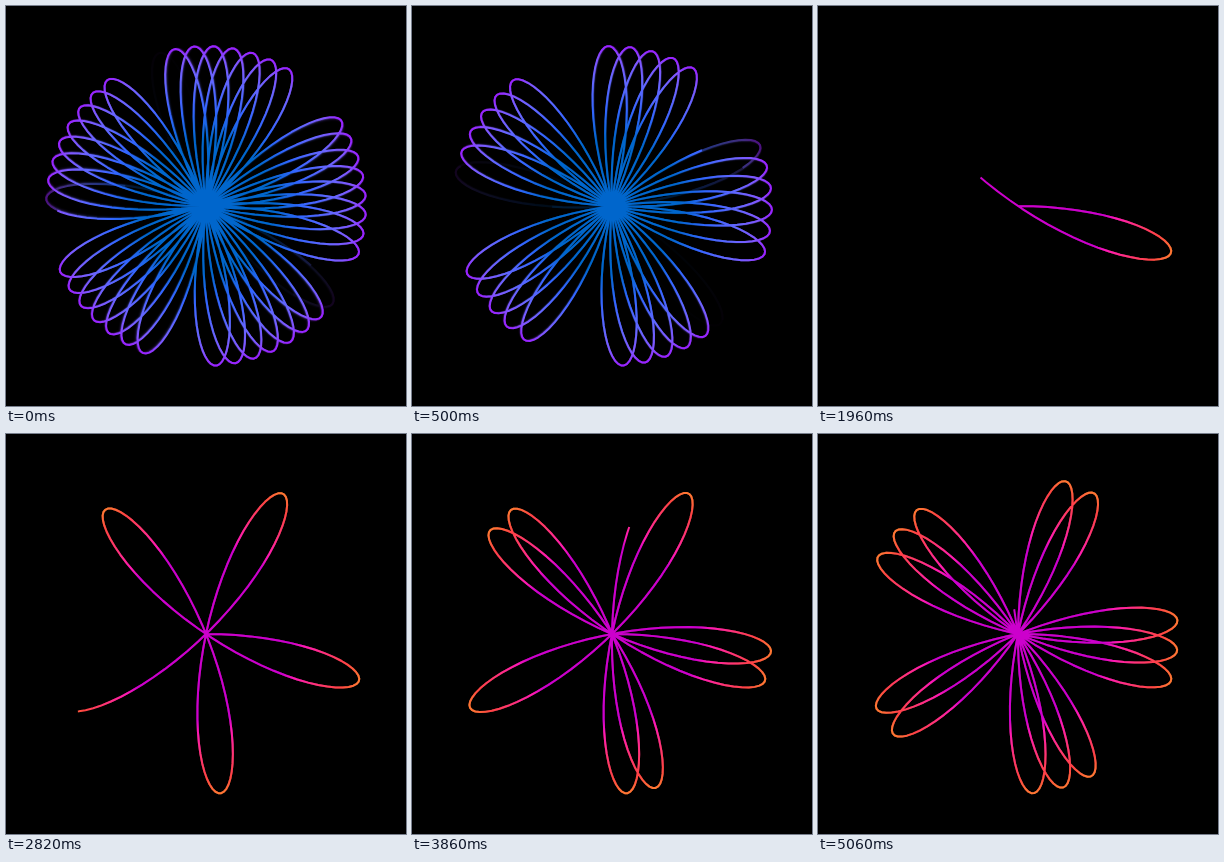
Animation of 400x400 px, one loop 5.08 s. Source, as an HTML page with a canvas:

```html
<!DOCTYPE html>
<html>
<head>
<meta charset="utf-8">
<style>
html, body { margin: 0; height: 100%; overflow: hidden; background: #000; }
canvas { display: block; }
</style>
</head>
<body>
<canvas id="stage" width="400" height="400"></canvas>
<script>
const ctx = document.getElementById('stage').getContext('2d');
const LOOP = 5080, STEP = 20, RADIUS = 160, SWITCH = 82, GHOSTS = 6;

function radial(stops) {
  const g = ctx.createRadialGradient(0, 0, 0, 0, 0, RADIUS);
  for (const [at, color] of stops) g.addColorStop(at, color);
  return g;
}
const cool = radial([[0, '#0066cc'], [0.42, '#0066cc'], [0.6, '#3366ff'],
  [0.8, '#6666ff'], [0.92, '#8055ff'], [1, '#9922ff']]);
const warm = radial([[0, '#cc00cc'], [0.54, '#cc00cc'], [0.62, '#ff1ab3'],
  [0.76, '#ff3377'], [0.9, '#ff4444'], [1, '#ff7733']]);

// Pen progress while drawing: [ms, petals]
const pen = [[1674, 0], [1960, 1.095], [2820, 4.385], [3860, 8.237], [5060, 13.05]];

function drawn(ms) {
  const i = Math.max(1, pen.findIndex(p => p[0] >= ms));
  const [t0, n0] = pen[i - 1], [t1, n1] = pen[i];
  return n0 + (n1 - n0) * (ms - t0) / (t1 - t0);
}

// Rose curve; its precession drifts as petals are erased and drawn
function rose(frame) {
  const erasing = frame < SWITCH;
  const petals = erasing ? 36.38 - 0.446 * frame : drawn(frame * STEP);
  if (petals <= 0) return;
  const drift = 9.91 + (erasing ? -0.078 : 0.078) * petals;
  const width = (36 - drift / 5) * Math.PI / 180;
  ctx.beginPath();
  ctx.moveTo(0, 0);
  for (let n = 0; n < petals;) {
    n = Math.min(n + 0.03, petals);
    const r = RADIUS * Math.sin(Math.PI * n);
    ctx.lineTo(r * Math.cos(n * width), r * Math.sin(n * width));
  }
  ctx.strokeStyle = erasing ? cool : warm;
  ctx.stroke();
}

function render(frame) {
  ctx.setTransform(1, 0, 0, 1, 200, 200);
  ctx.lineWidth = 2;
  ctx.lineJoin = 'round';
  ctx.fillStyle = '#000';
  ctx.fillRect(-200, -200, 400, 400);
  ctx.fillStyle = 'rgba(0,0,0,.5)';
  for (let back = GHOSTS; back >= 0; back--) {
    ctx.fillRect(-200, -200, 400, 400);
    rose(frame - back);
  }
}

const start = performance.now();
let last = -1;
function tick() {
  const frame = Math.floor((performance.now() - start) % LOOP / STEP);
  if (frame !== last) render(last = frame);
  requestAnimationFrame(tick);
}
tick();
</script>
</body>
</html>
```
